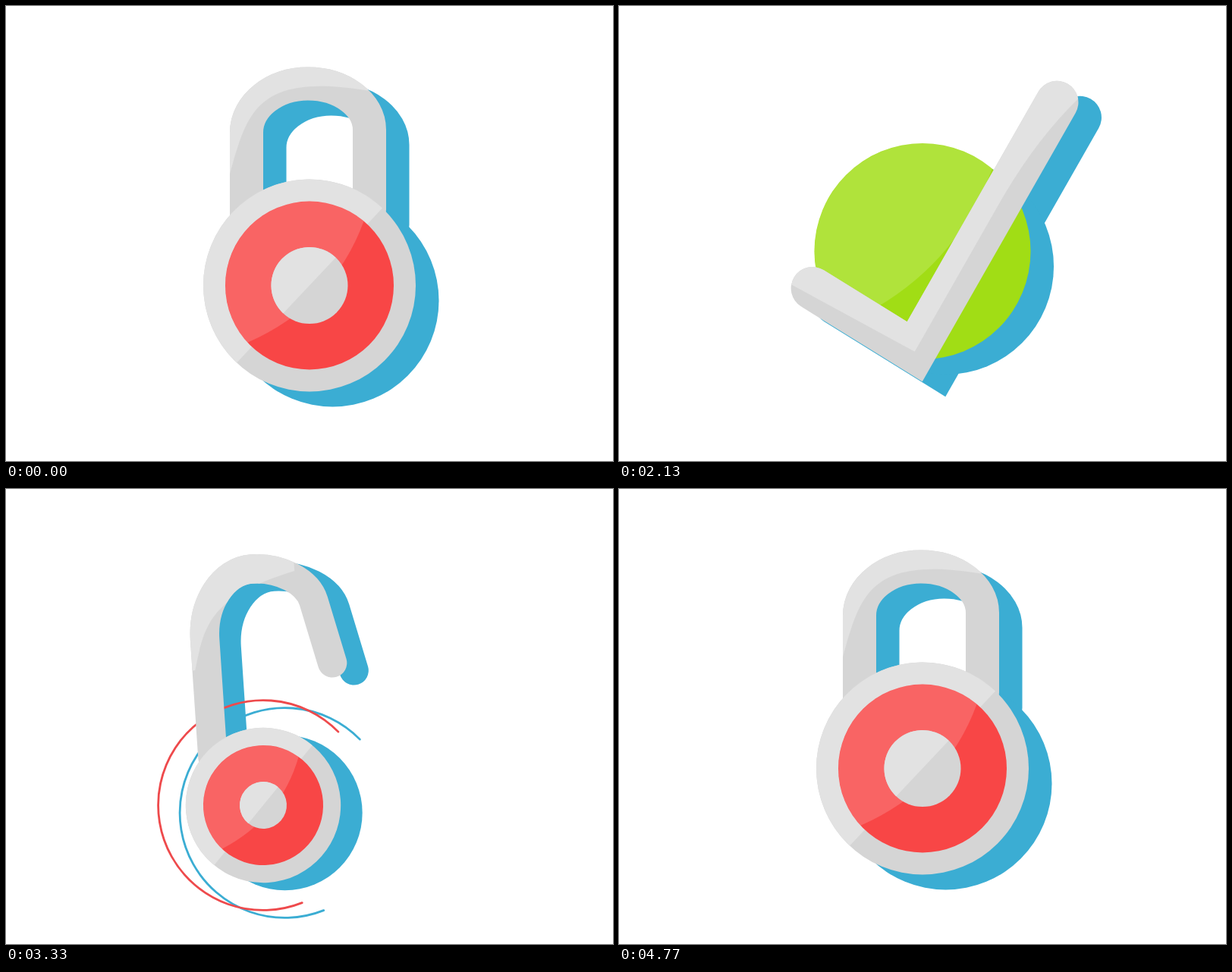
An HTML page that plays this animation: 800 by 600 pixels, repeating every 4800 ms.

```html
<!DOCTYPE html>
<html lang="en">
<head>
<meta charset="utf-8">
<title>Lock and check</title>
<style>
  html, body { margin: 0; width: 100%; height: 100%; overflow: hidden; background: #fff; }
  svg { display: block; width: 100vw; height: 100vh; }
</style>
</head>
<body>
<svg id="stage" viewBox="0 0 800 600">
  <defs>
    <clipPath id="lit"><path id="litShape"/></clipPath>
    <g id="metal">
      <circle r="1" fill="#d5d5d5"/>
      <path fill="#e2e2e2" d="M-1 0A1 1 0 0 1 1 0Z" transform="rotate(-46.7)"/>
    </g>
  </defs>
  <g id="shadow" fill="none" stroke="#3badd3" stroke-linecap="round">
    <path id="ringShade"/>
    <path id="bowShade" stroke-miterlimit="8"/>
    <circle id="discShade" fill="#3badd3" stroke="none"/>
  </g>
  <path id="ring" fill="none" stroke-linecap="round"/>
  <g id="bow" fill="none" stroke-linecap="round" stroke-miterlimit="8">
    <path id="bowBase" stroke="#d5d5d5"/>
    <path id="bowLight" stroke="#e2e2e2" clip-path="url(#lit)"/>
  </g>
  <g id="ball">
    <use id="rim" href="#metal"/>
    <g transform="scale(111)">
      <circle id="paint" r="1"/>
      <path fill="#fff" fill-opacity=".16" d="M-.735 .678A1 1 0 0 1 .645 -.764Q.28 .23 -.735 .678Z"/>
    </g>
    <use id="hub" href="#metal"/>
  </g>
</svg>
<script>
const LOOP = 4800, STEP = 30, FACE = 111;
const el = {};
document.querySelectorAll('[id]').forEach(n => el[n.id] = n);

const set = (node, attrs) => {
  for (const name in attrs) node.setAttribute(name, attrs[name]);
};
const mix = (a, b, k) => Array.isArray(a) ? a.map((v, i) => mix(v, b[i], k)) : a + (b - a) * k;
const clamp = x => Math.min(1, Math.max(0, x));
const smooth = k => k * k * (3 - 2 * k);
const easeOut = (k, power = 2) => 1 - (1 - k) ** power;
const ramp = (t, a, b) => smooth(clamp((t - a) / (b - a)));
const shift = ([x, y], dx, dy) => [x + dx, y + dy];

// A bow is four corners: end, bend, bend, end. A check has both bends in one place.
const closed = [[-83, -90], [-83, -266], [79, -266], [79, -100]];
const lifted = closed.map((p, i) => shift(p, i < 2 ? -4 : 3, i ? -45 : 0));
const stretched = [[-87, -95], [-86, -438], [104, -438], [146, -254]];
const cup = [[-65, 157], [-102, 288], [32, 290], [99, 157]];
const tick = [[-113, 38], [-8, 103], [-8, 103], [138, -153]];
const gone = closed.map(() => [0, 0]);

const lock = { x: 400, y: 368.5, size: 1, turn: 0, dx: 30.5, dy: 20,
  rim: 140, hub: 50.5, width: 44, bow: closed };
const spring = { ...lock, size: .97, turn: 20, bow: lifted };
const tiny = { ...lock, x: 401, y: 349.5, size: .293, turn: 180, dx: 2.5, dy: 3,
  rim: 109, hub: 0, bow: cup.map(p => mix(p, [0, 0], 2)).reverse() };
const badge = { ...lock, y: 323.5, size: 1.284, turn: 360, rim: 109, hub: 0, bow: tick };
const ball = { ...badge, x: 403, y: 325, dx: 29, width: 0, bow: gone };
const seed = { ...ball, x: 370, y: 380, size: .5, dy: 8 };
const open = { ...lock, x: 339, y: 417, size: .712, turn: 356, dx: 28.5, dy: 10,
  rim: 143.5, hub: 43.5, width: 54, bow: stretched };
const tall = { ...lock, y: 375, size: 1.106, turn: 345, dx: 55.5, dy: 19,
  width: 45, bow: lifted };
const swell = { ...tall, size: 1.16, turn: 344, dx: 85 };
const landed = { ...lock, turn: 360, dx: 150 };
const settled = { ...lock, turn: 360 };

const timeline = [
  [0, lock], [30, lock], [180, spring], [540, tiny], [541, { ...tiny, bow: cup }],
  [1350, badge, easeOut], [2130, badge], [2640, ball], [2700, ball], [3180, seed],
  [3330, open, easeOut], [3810, tall], [3930, swell], [4290, landed], [4740, settled],
  [LOOP, settled]
];

function stateAt(t) {
  const i = Math.max(1, timeline.findIndex(([time]) => time >= t));
  const [t0, a] = timeline[i - 1], [t1, b, ease = smooth] = timeline[i];
  const k = ease((t - t0) / (t1 - t0));
  const early = Math.min(1, k * 1.1);
  const state = {};
  for (const name in a) {
    state[name] = mix(a[name], b[name], name === 'bow' || name === 'turn' ? early : k);
  }
  // The light swings from side to side while the check leaves.
  if (t > 2130 && t < 2940) state.dx -= 200 * Math.sin((t - 2130) / 540 * 2 * Math.PI);
  return state;
}

const sweeps = [
  { from: 480, to: 1110, color: '#8fd82f', start: [140, 280], end: [146, 308],
    radius: (u, size) => 153 * size, width: size => .8 + 2 * size },
  { from: 3210, to: 3810, color: '#ee4a4c', start: [40, 312], end: [300, 318],
    radius: u => mix(130, 172, u), width: () => 2.8 }
];

function arc(r, from, to) {
  const at = deg => {
    const q = deg * Math.PI / 180;
    return [r * Math.cos(q), r * Math.sin(q)];
  };
  return `M${at(from)}A${r} ${r} 0 ${to - from > 180 ? 1 : 0} 1 ${at(to)}`;
}

function bowGeometry([a, b, c, d]) {
  const left = mix(b, a, .365), right = mix(c, d, .365), top = mix(b, c, .5);
  const path = `M${a}L${left}C${mix(left, b, .55)} ${mix(top, b, .55)} ${top}` +
    `C${mix(top, c, .55)} ${mix(right, c, .55)} ${right}L${d}`;
  return { path, left, top };
}

const lockLight = (left, top) =>
  `M${shift(left, -22, 55)}C${shift(left, 1, -27)} ${shift(left, 13, -79)} ` +
  `${shift(top, 79, 9)}v-100L${shift(left, -90, -200)}v255Z`;

const tickLight = ([a, b, c, d]) =>
  `M${shift(a, -56, -22)}L${shift(a, -20, -3)}L${b}L${mix(c, d, .6)}` +
  `Q${mix(c, d, .85)} ${shift(d, 23, -5)}v-70L${shift(a, -56, -250)}Z`;

function paintColor(t) {
  const k = ramp(t, 560, 740) - ramp(t, 3000, 3200);
  return `rgb(${mix([248, 70, 70], [161, 221, 21], k).map(Math.round)})`;
}

function drawRing(t, size, place) {
  const sweep = sweeps.find(w => t >= w.from && t <= w.to);
  if (!sweep) {
    set(el.ring, { d: '' });
    set(el.ringShade, { d: '' });
    return;
  }
  const u = (t - sweep.from) / (sweep.to - sweep.from);
  const line = {
    d: arc(sweep.radius(u, size), mix(...sweep.start, smooth(u)), mix(...sweep.end, easeOut(u, 9))),
    'stroke-width': sweep.width(size)
  };
  set(el.ringShade, line);
  set(el.ring, { ...line, transform: place, stroke: sweep.color });
}

function draw(t) {
  const { x, y, size, turn, dx, dy, rim, hub, width, bow } = stateAt(t);
  const checking = t > 540 && t < 2640;
  const place = `translate(${x} ${y})`;
  const pose = `rotate(${checking ? 0 : turn}) scale(${size})`;

  const { path, left, top } = bowGeometry(bow);
  const line = {
    d: path, 'stroke-width': width, visibility: width < .5 ? 'hidden' : 'visible'
  };
  set(el.bowBase, line);
  set(el.bowShade, { ...line, transform: pose });
  set(el.bow, { transform: `${place} ${pose}` });
  set(el.litShape, { d: checking ? tickLight(bow) : lockLight(left, top) });
  const glow = checking ? ramp(t, 650, 950) : t <= 540 ? 1 - ramp(t, 200, 480) : 1;
  set(el.bowLight, { ...line, opacity: glow });

  set(el.ball, { transform: `${place} rotate(${turn}) scale(${size})` });
  set(el.rim, { transform: `scale(${rim})` });
  set(el.hub, { transform: `scale(${hub})` });
  set(el.paint, { fill: paintColor(t) });
  set(el.discShade, { r: Math.max(rim, FACE) * size });
  set(el.shadow, { transform: `translate(${x + dx} ${y + dy})` });
  drawRing(t, size, place);

  // The check lies over the ball, the shackle behind it.
  const front = checking ? el.bow : el.ball;
  if (el.stage.lastElementChild !== front) el.stage.append(front);
}

const origin = performance.now();
function frame() {
  const t = Math.max(0, performance.now() - origin) % LOOP;
  draw(Math.floor(t / STEP) * STEP);
  requestAnimationFrame(frame);
}
frame();
</script>
</body>
</html>
```
